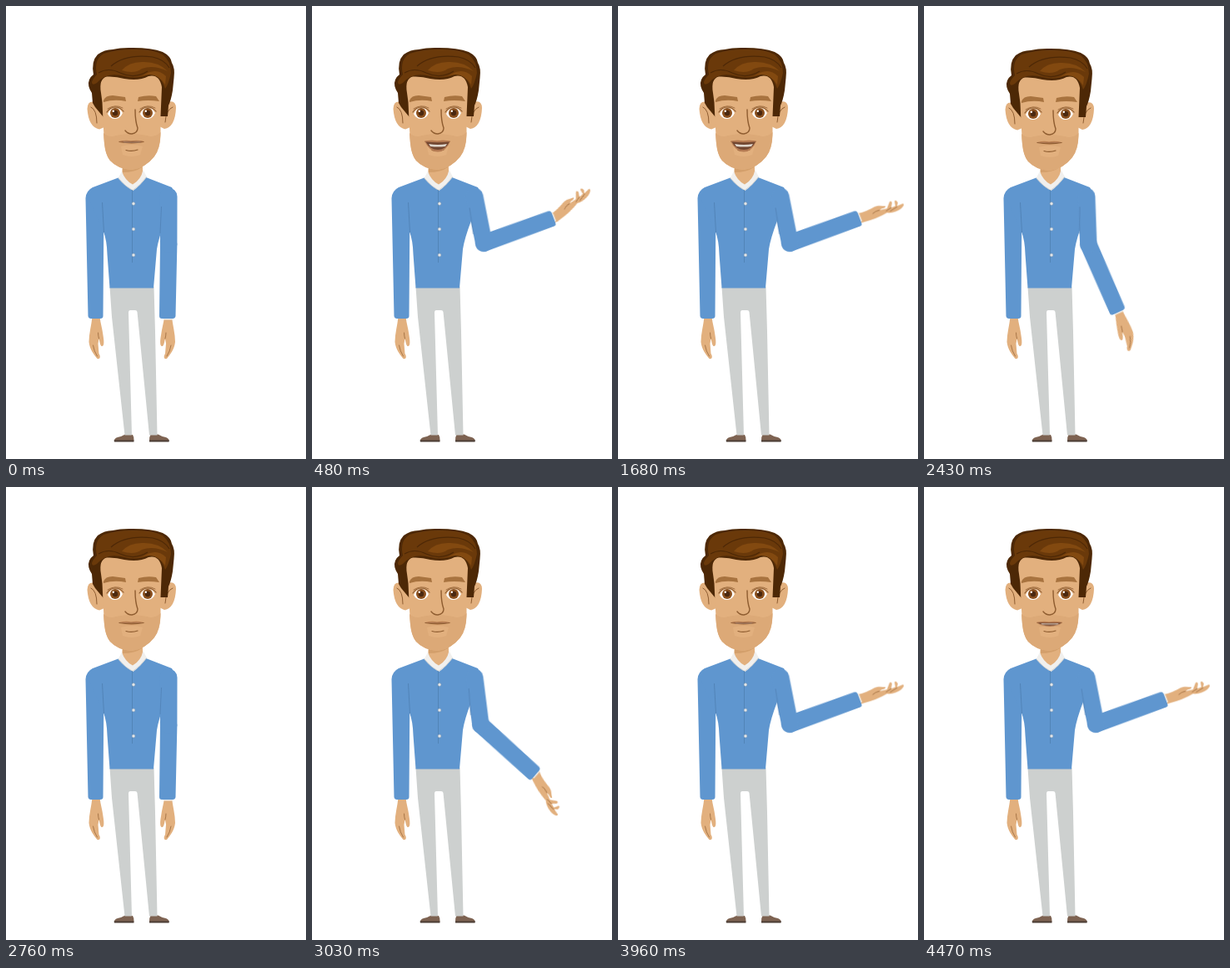
An HTML page that plays this animation: 360x542 px, repeating every 4500 ms.

```html
<!DOCTYPE html>
<html lang="en">
<head>
<meta charset="utf-8">
<title>Presenter</title>
<style>
html, body { margin: 0; width: 100%; height: 100%; overflow: hidden; background: #fff; }
svg { display: block; width: 360px; height: 542px; }

.shirt { fill: #5f96cf; }
.skin { fill: #e2b07e; }
.line { fill: none; stroke: #8e5c30; stroke-linecap: round; }

.upper, .fore, .hand, .open, .relaxed, .mouth, .head {
  animation: 4.5s cubic-bezier(.4, 0, .5, 1) infinite;
}
.upper { transform-origin: 195px 228px; animation-name: upper; }
.fore { transform-origin: 195px 285px; animation-name: fore; }
.hand { transform-origin: 194px 374px; animation-name: hand; }
.open { animation-name: open; animation-timing-function: step-end; }
.relaxed { animation-name: relaxed; animation-timing-function: step-end; }
.mouth { transform-origin: 150px 162px; animation-name: talk; }
.head { animation-name: nod; }

@keyframes upper {
  0%, 1%, 56.4%, 63% { transform: rotate(0deg); }
  9%, 49.4%, 71%, 100% { transform: rotate(-11.3deg); }
}
@keyframes fore {
  0%, 1%, 56.6%, 63.6% { transform: rotate(0deg); }
  10%, 49.6%, 72.6%, 100% { transform: rotate(-99.5deg); }
}
@keyframes hand {
  0%, 1%, 56.4%, 63% { transform: rotate(0deg); }
  5.3%, 67.3% { transform: rotate(22deg); }
  8%, 70% { transform: rotate(8deg); }
  10.7%, 72.8% { transform: rotate(-16deg); }
  14%, 49%, 76%, 100% { transform: rotate(5deg); }
  54% { transform: rotate(6deg); }
}
@keyframes open {
  0%, 53% { opacity: 0; }
  4.3%, 66.3%, 100% { opacity: 1; }
}
@keyframes relaxed {
  0%, 53% { opacity: 1; }
  4.3%, 66.3%, 100% { opacity: 0; }
}
@keyframes talk {
  0% { transform: scaleY(.15); }
  7%, 47% { transform: scaleY(1); }
  51%, 76% { transform: scaleY(.05); }
  78%, 95% { transform: scaleY(.15); }
  100% { transform: scaleY(.4); }
}
@keyframes nod {
  0%, 49%, 60%, 100% { transform: translateY(0); }
  54% { transform: translateY(1px); }
}
</style>
</head>
<body>
<svg viewBox="0 0 360 542">
  <defs>
    <g id="hang">
      <path class="skin" d="M-4-2L5-2C6 8 9 18 9 28C8 37 3 43-1 48C-5 49-5 45-3 42L-2 30L-3 24C-4 27-4 31-6 33C-10 34-9 26-8 20C-7 12-5 6-4-2Z"/>
      <path class="line" stroke="#c99a68" stroke-width=".7" d="M4 32Q3 39-1 45M-3 24Q-2 20-2 17"/>
    </g>
    <g id="eye">
      <path fill="#fff" d="M-9 1Q-6-6 0-6Q6-6 9 0Q6 7 0 7Q-6 7-9 1Z"/>
      <circle r="6" fill="#8a4f1d"/>
      <circle r="3.2" fill="#4a2810"/>
      <circle cx="-2.2" cy="-2.2" r="1.2" fill="#fff"/>
      <path class="line" stroke="#a06c3c" stroke-width="1.2" d="M-10-1Q-6-7 0-7Q6-7 10-2"/>
      <path class="line" stroke="#cb9562" stroke-width=".8" d="M-9-5Q0-11 9-6"/>
    </g>
    <g id="shoe">
      <path fill="#7d6251" d="M0 519Q1 516 8 515L13 512.5L22 513Q24 516 23.500 520H0Z"/>
      <path fill="#4b3c35" d="M-.5 519.500H23.500V521.500H0Z"/>
    </g>
  </defs>

  <!-- legs -->
  <use href="#shoe" x="130"/>
  <use href="#shoe" transform="matrix(-1 0 0 1 195.500 0)"/>
  <path fill="#cdd0cf" d="M124.500 336H177.500L179 390L181.500 513.500H172L157.500 366Q157 364 155 364H149Q147 364 147 367L151 513.500H142.500L127 372Z"/>

  <!-- left arm -->
  <use href="#hang" transform="matrix(-1 0 0 1 108.500 374)"/>
  <path class="shirt" d="M104 217Q96 221 95.500 230L98.500 371Q99 374 102 374H113Q116.500 374 116.500 371L117.500 230Z"/>

  <!-- neck and torso -->
  <path class="shirt" d="M136 205L104 217L100 232L117 270Q121 280 121.500 297L124.500 337.500H177L181 291Q183 278 191 257L203 225L199 217L168 205L152 220Z"/>
  <path class="skin" d="M140 184H164V205L152 217L139 206Z"/>
  <path fill="#d39f6b" d="M140 184H163V193Q155 199 140 199Z"/>
  <path fill="#f1f0ee" d="M134.500 206L139 198Q143 209 152 213.500Q162 208 164.500 196L169 204.500Q160 216 152.500 221Q143 216 134.500 206Z"/>
  <path fill="none" stroke="#c9c9c8" stroke-width=".7" d="M135 206Q143 216 152 220.500Q161 215 168.500 204.500"/>
  <path fill="none" stroke="#4f7fb2" stroke-width=".8" d="M151.500 220V307M117.500 271L115.500 235"/>
  <g fill="#e4e6e8" stroke="#718eac" stroke-width=".5">
    <circle cx="153" cy="236.500" r="2"/>
    <circle cx="153" cy="267" r="2"/>
    <circle cx="153" cy="298" r="2"/>
  </g>

  <!-- right arm -->
  <g class="upper">
    <g class="fore">
      <g class="hand">
        <g class="relaxed"><use href="#hang" x="194" y="374"/></g>
        <g class="open">
          <g transform="translate(194 374) rotate(106)">
            <path class="skin" d="M-3-5C6-6 12-10 18-13C22-15 27-14 31-14Q32-12 27-11L24-9L33-11L36-19Q38-21 39-18L38-12L43-14L42-20Q44-22 46-18L45-14L52-17Q55-16 50-11Q42-5 33-6Q22 1 3 6L-2 6Z"/>
            <path class="line" stroke="#c99a68" stroke-width=".7" d="M24-9Q19-8 16-5M38-12L32-8M45-13L37-8"/>
          </g>
        </g>
      </g>
      <path fill="#ecebea" d="M187.500 370H200.500L199.500 375.500H189Z"/>
      <path class="shirt" d="M185 285A10.200 10.200 0 0 1 205.400 285L203.500 371Q203 374 200 374H187Q184 374 184 371Z"/>
    </g>
    <path class="shirt" d="M184.500 228A10.500 10.500 0 0 1 205.500 228L205.400 285A10.200 10.200 0 0 1 185 285Z"/>
    <path fill="none" stroke="#4f7fb2" stroke-width=".7" d="M185 272L186.500 240"/>
  </g>

  <!-- head -->
  <g class="head">
    <path class="skin" d="M112 117Q98 110 97.500 123Q99 145 112 147.500L118 145V119ZM188 118Q203.500 109 204 122Q203 145 190 147L184 144V119Z"/>
    <path class="line" stroke="#c9925d" d="M102 121Q109 124 109 140M200 121Q192 124 191 139"/>
    <path fill="#4d2806" d="M104 116L103 104Q97 95 100 88Q102 84 105 82Q102 66 110 58Q118 52 128 52Q138 49.500 152 50Q175 50 188 55Q198 60 199 68Q203 74 201.500 86L200 101Q198 113 195 119L194 132H184L117 133L107 121Z"/>
    <path class="skin" d="M114 104Q111 87 121 84.500Q132 84 142 87Q160 90 171 84Q184 81 187 97L185.500 132L185.500 155Q185 171 178 180Q167 194 151 196Q134 195 125 185Q119 178 118 164L116.500 138L115.500 115Z"/>
    <path fill="#6a390a" d="M109 82Q105 64 117 57Q134 52 151 52Q175 51 188 58Q198 66 198 80Q195 94 191 99Q185 81 171 82Q158 88 142 84Q121 78 109 92Q103 96 103 91Q104 87 109 82Z"/>
    <path fill="#824910" d="M139 77Q148 66 166 67Q183 67 194 78Q177 70 163 75Q154 82 139 77ZM163 84Q180 72 192 84L191 94Q180 77 163 84Z"/>
    <path fill="none" stroke="#4d2806" stroke-width="1.200" d="M111 80Q123 73 137 80Q154 88 170 78M126 72Q143 57 176 61Q190 64 196 74"/>

    <path fill="#dca977" d="M117 152Q124 158 132 155Q150 151 169 155Q178 158 185.500 151Q185 171 178 180Q167 194 151 196Q134 195 125 185Q118 177 117 152Z"/>
    <path fill="#e2b07e" d="M138 168Q151 164 164 168L161 178Q151 182 140 178Z"/>
    <path fill="#a8733f" d="M117 113Q119 107 128 107L143 109L144 114Q130 111 117 115ZM159 109Q170 106 180 108L184 114Q170 112 158 114Z"/>
    <use href="#eye" x="131" y="128"/>
    <use href="#eye" x="170" y="128"/>
    <path class="line" stroke="#b07a48" stroke-width="1.400" d="M155 124Q155 138 158 146Q158 152 151 153Q146 153 143 149"/>

    <path fill="#bd8151" d="M136 162Q144 160 150 161.500Q157 160 165 162Q151 167 136 162Z"/>
    <path class="line" stroke="#96623c" stroke-width="1.200" d="M136 162.500Q151 165 165 162.500"/>
    <path class="line" stroke="#c69363" stroke-width="1.200" d="M144 172.500Q151 174.500 158 172"/>
    <g class="mouth">
      <path fill="#b47a52" d="M135 161.500Q143 160 150 161.500Q158 160 166 161.500Q161 174.500 151 174.500Q141 174.500 135 161.500Z"/>
      <path fill="#714630" d="M136.500 162.500Q151 164 165 162.500Q160 172 151 172Q142 172 136.500 162.500Z"/>
      <path fill="#dfd6cb" d="M140 165Q151 167 162 165L160 168Q151 169 142 168Z"/>
    </g>
  </g>
</svg>
</body>
</html>
```
